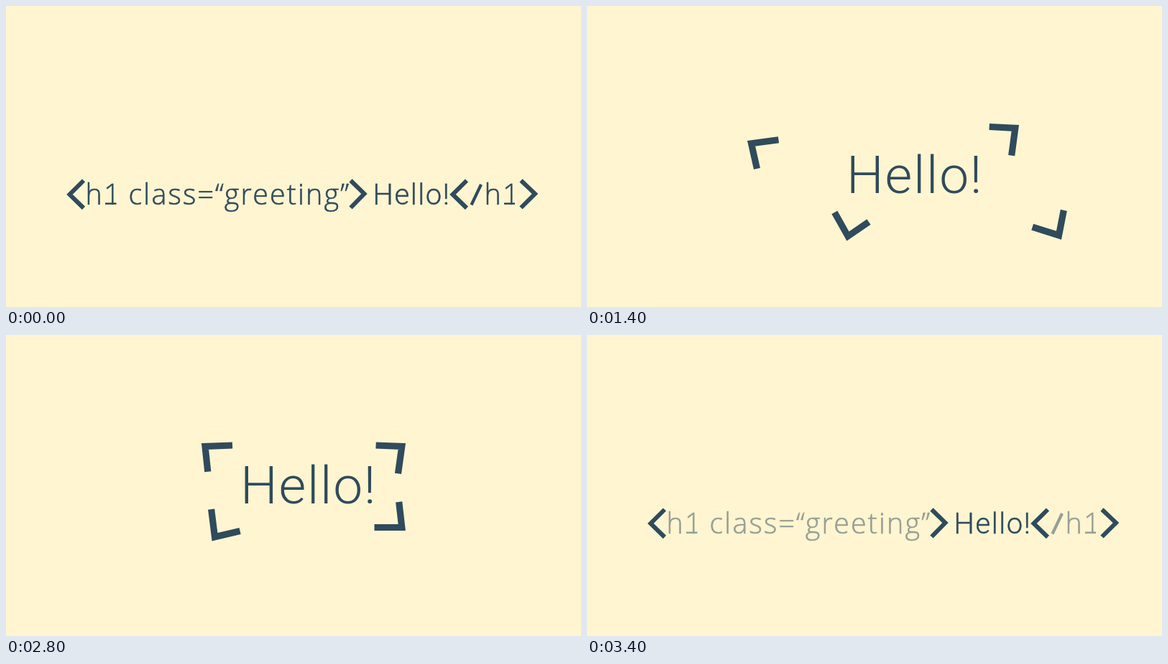
An HTML page that plays this animation: 800 by 420 pixels, repeating every 3.6 s.

```html
<!DOCTYPE html>
<html lang="en">
<head>
<meta charset="utf-8">
<title>Tag to box</title>
<style>
  html, body { margin: 0; width: 100%; height: 100%; overflow: hidden; background: #fff5d0; }
  svg { display: block; width: 800px; height: 420px; }
  text { font-weight: 300; fill: #2f4b5c; stroke: #2f4b5c; white-space: pre; }
  path { fill: none; stroke: #2f4b5c; }
  #hello { font-family: Roboto, "Liberation Sans", sans-serif; }
  #markup text {
    font-family: "Open Sans", "Noto Sans", sans-serif;
    font-size: 39.5px; letter-spacing: .053em; stroke-width: .6px;
  }
</style>
</head>
<body>
<svg viewBox="0 0 800 420">
  <rect width="800" height="420" fill="#fff5d0"/>
  <g id="markup">
    <text x="110.5" y="277">h1</text>
    <text x="170.5" y="277">class=“greeting”</text>
    <text x="665.5" y="277">h1</text>
    <path d="M138 275.8H153.5M693 275.8H708" stroke-width="2.6"/>
    <path d="M647.5 277.5L661 249" stroke-width="4.2"/>
  </g>
  <text id="hello">Hello!</text>
  <path id="brackets" stroke-miterlimit="8"/>
  <g id="box">
    <path d="M271.5 145H556.5M271.5 274H556.5" stroke-width="9.2" stroke-dasharray="28 18" stroke-dashoffset="9.5"/>
    <path d="M276 140.5V278.5M552 140.5V278.5" stroke-width="9.2" stroke-dasharray="26.5 16.75" stroke-dashoffset="9"/>
  </g>
</svg>
<script>
const [markup, hello, brackets, box] =
  ["markup", "hello", "brackets", "box"].map(id => document.getElementById(id));

// Each bracket runs end, corner, end along its centre line.
const inline = {
  hello: { x: 510.5, y: 277, size: 40, spacing: .04, outline: .4 },
  weight: 6,
  brackets: "M108 243.5L88.5 263L108 282M479.5 243.5L498.5 262L479.5 281.5" +
            "M641 243.5L621.5 263L641 282M716.5 243.5L736 262L716.5 281.5"
};
const lifting = {
  hello: { x: 435, y: 270, size: 56, spacing: .03, outline: .2 },
  weight: 7.6,
  brackets: "M102 214L71 232L90 261M517 192L548 206L533 236" +
            "M505 311L500 345L534 347M686 267L696 300L663 308"
};
const flying = {
  hello: { x: 361, y: 261, size: 73, spacing: .024, outline: 0 },
  weight: 9.2,
  brackets: "M266.5 186.7L228.6 191.8L236.5 227M559.7 168.5L595.8 170.4L590.7 208.6" +
            "M344.4 288.1L363 321.2L392 301.3M663.3 285L656.5 320L619.7 308.3"
};
const settled = { x: 326, y: 235, size: 73, spacing: .024, outline: 0 };
const landing = {
  hello: settled,
  weight: 9.2,
  brackets: "M315 154L277 155.5L280.8 190.8M514.6 154L550.8 155.5L545.5 193.3" +
            "M285.6 243.2L290.5 281.8L325.6 273.5M546.7 232.9L550.8 268.5L512.5 268.5"
};
const boxed = { hello: settled, weight: 0, brackets: "", box: true };

const whole = { ...inline, markup: 1 };
const dimmed = { ...inline, markup: .5 };
const fading = { ...lifting, markup: .2 };

const LOOP = 3600, STEP = 200, HOLD = 1000;
const opening = [dimmed, fading, flying, landing];
const closing = [...opening].reverse();

function poseAt(t) {
  if (t < HOLD) return whole;
  const step = Math.floor((t - HOLD) / STEP);
  if (step < opening.length) return opening[step];
  const back = step - opening.length - HOLD / STEP;
  return back < 0 ? boxed : closing[back];
}

function draw(pose) {
  const { x, y, size, spacing, outline } = pose.hello;
  hello.setAttribute("x", x);
  hello.setAttribute("y", y);
  hello.setAttribute("style",
    `font-size:${size}px;letter-spacing:${spacing}em;stroke-width:${outline}px`);
  markup.setAttribute("opacity", pose.markup || 0);
  brackets.setAttribute("d", pose.brackets);
  brackets.setAttribute("stroke-width", pose.weight);
  box.setAttribute("opacity", pose.box ? 1 : 0);
}

const start = performance.now();
function tick() {
  draw(poseAt((performance.now() - start) % LOOP));
  requestAnimationFrame(tick);
}
tick();
</script>
</body>
</html>
```
